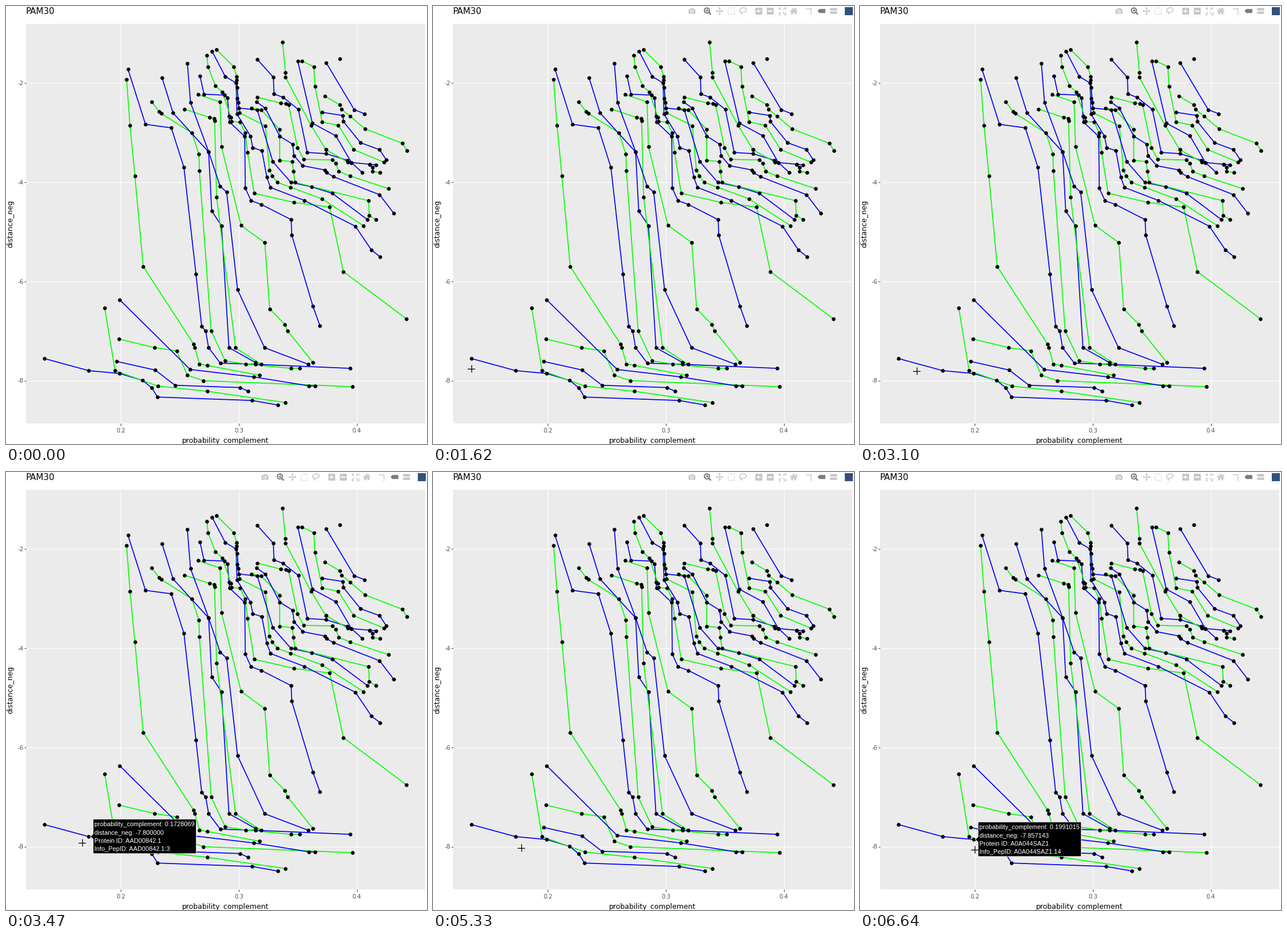
A matplotlib script for the animation above (8000 ms loop, 734 by 763 pixels).

```python
import matplotlib.pyplot as plt
import numpy as np
from matplotlib.animation import FuncAnimation
from matplotlib.collections import LineCollection
from matplotlib.patches import Circle, Ellipse, FancyBboxPatch, Polygon, Rectangle

W, H, DPI = 734, 763, 100
STEP, LOOP = 40, 8000
PX = 72 / DPI  # points per pixel
BLUE, GREEN = "#0000ff", "#00ff00"
PALE, ACTIVE, NAVY = "#c7c7c7", "#7c7c7c", "#33507f"

fig = plt.figure(figsize=(W / DPI, H / DPI), dpi=DPI, facecolor="white")
ax = fig.add_axes([0, 0, 1, 1])
ax.set_xlim(0, W)
ax.set_ylim(H, 0)
ax.axis("off")


def line(xs, ys, color, width, z, **kw):
    kw.setdefault("solid_capstyle", "butt")
    return ax.plot(xs, ys, color=color, lw=width * PX, zorder=z, **kw)[0]


def label(x, y, text, size, color="black", font="DejaVu Sans", z=1, **kw):
    return ax.text(x, y, text, size=size * PX, color=color, family=font,
                   va="baseline", zorder=z, **kw)


# Panel, grid and axis text
ax.add_patch(Rectangle((35, 31), 696, 696, fc="#ebebeb", ec="none", zorder=0))
for x, text in zip((200.2, 405.9, 611.7), ("0.2", "0.3", "0.4")):
    line([x, x], [31, 727], "white", 1.1, 1)
    line([x, x], [727, 730.5], "#333333", 1, 1)
    label(x, 743.2, text, 10, "#4d4d4d", ha="center")
for y, text in zip((134.4, 307.2, 479.9, 652.6), ("-2", "-4", "-6", "-8")):
    line([35, 731], [y, y], "white", 1.1, 1)
    line([31.5, 35], [y, y], "#333333", 1, 1)
    label(30.8, y + 3.8, text, 10, "#4d4d4d", ha="right")
label(35, 14.5, "PAM30", 15)
label(383, 761, "probability_complement", 12.5, ha="center")
label(11.3, 379.5, "distance_neg", 12.5, ha="center", rotation=90,
      rotation_mode="anchor")

# Fronts: every call joins its points from left to right
paths, colors = [], []


def front(color, *xy):
    paths.append(np.reshape(xy, (-1, 2)) + 0.2)
    colors.append(color)


front(BLUE, 67, 614, 144, 635, 198, 640, 238, 652, 254, 665, 264, 681,
      429, 687, 474, 695)
front(GREEN, 172, 526, 190, 635, 265, 662, 351, 671, 486.5, 690.5)
front(BLUE, 193, 619, 260, 634, 294.5, 660.5, 408, 664.5, 422, 671)
front(GREEN, 197, 580, 259, 595, 297.5, 600.5, 316, 643, 344, 652.5,
      604, 663)
front(BLUE, 198, 511.5, 321, 633, 432, 646, 528, 661.5, 539, 662)
front(GREEN, 210, 128, 216, 207.5, 224.5, 295.5, 239, 453.5, 327, 589,
      329, 595, 337, 623.5, 351, 626, 441.5, 643)
front(BLUE, 212.5, 110, 243, 206, 288, 212, 310, 281, 331, 467, 341, 558,
      348, 566, 353, 595, 373.5, 622, 435, 624, 600, 631)
front(GREEN, 254, 167, 267, 184, 270.5, 187, 324, 221, 336, 257.5,
      337, 287, 357.5, 566, 382, 618, 418, 623.5, 497, 631, 512, 631)
front(BLUE, 272, 125, 291, 186, 353, 254, 358.5, 357, 375.5, 382.5,
      388.5, 595, 435, 621)
front(GREEN, 311, 179.5, 355, 194, 363, 195.5, 363.5, 200, 367, 333,
      400, 595, 444.5, 624)
front(BLUE, 316, 100, 321.5, 168, 353, 253.5, 373, 313.5, 384.5, 324,
      403.5, 494, 450.5, 595, 527, 624)
front(GREEN, 334.5, 154, 373, 167, 375.5, 245, 409.5, 382, 451, 412,
      459.5, 527.5, 486, 554.5, 491, 566, 535, 621)
front(BLUE, 338, 121.5, 345, 153.5, 381, 155, 386, 159.5, 388.5, 192,
      389.5, 202, 416, 227, 417, 317, 427, 339, 445, 345.5, 497, 372,
      498, 399, 535, 523, 547, 556.5)
front(GREEN, 350, 85.5, 352, 105.5, 365, 139, 377, 149.5, 392, 194,
      393, 201, 408, 202, 417, 221, 421, 255, 432.5, 326, 502, 342,
      564, 350, 588, 462.5, 697.5, 544.5)
front(BLUE, 359, 78.5, 382, 122.5, 401, 134, 402.5, 188, 426, 226.5,
      430, 246.5, 446, 252, 454.5, 298, 461, 316, 520, 338.5, 609, 383.5,
      637, 425, 652, 436.5)
front(GREEN, 367, 76, 397, 105.5, 402, 123, 403, 142, 403, 161, 407, 186,
      452, 208.5, 459, 285.5, 464, 296, 473, 307, 496, 315.5, 551, 336,
      623, 382.5)
front(BLUE, 402, 129, 405, 168, 406, 177.5, 438, 181, 465, 271, 496.5, 307,
      533, 315, 568.5, 326, 630, 372)
front(GREEN, 428, 177.5, 445, 181, 477, 215, 477, 268.5, 499, 271,
      501, 288, 503.5, 307, 632, 339, 633, 365, 645, 372)
front(BLUE, 437, 167, 452, 178, 477, 226.5, 499.5, 240.5, 502, 260.5,
      517, 278, 556, 285.5, 558.5, 290, 570.5, 297, 651, 328.5, 676, 361)
front(GREEN, 437.5, 158.5, 479, 169, 488, 170, 492.5, 172, 508, 247,
      519, 267, 569, 268, 575, 274, 580, 288, 600, 296, 667, 318)
front(BLUE, 438, 93, 466, 124, 467, 153, 483, 159, 509.5, 180, 525, 255,
      557.5, 257, 594.5, 268.5, 602, 272.5, 634, 275.5, 645, 276.5)
front(GREEN, 482, 62.5, 487, 115.5, 487, 124, 531.5, 207.5, 557.5, 250)
front(GREEN, 557.5, 250, 596, 272)
front(GREEN, 634, 275.5, 638.5, 281, 638.5, 288, 652, 290)
front(BLUE, 508.5, 96, 534, 204, 575, 226, 602, 272.5, 621, 290)
front(GREEN, 515.5, 95.5, 536.5, 105.5, 538.5, 139.5, 551, 202, 579, 207.5,
      606, 250, 659, 272)
front(BLUE, 551, 185, 587, 190.5, 588, 201, 618, 238, 651, 250, 663, 268)
front(GREEN, 556, 157, 582, 172, 585, 180, 600, 192, 626, 214, 691, 239,
      699, 252)
front(BLUE, 558, 98.5, 607, 180.5, 625, 187.5)
front(BLUE, 581.5, 91.5)

ax.add_collection(LineCollection([p for p in paths if len(p) > 1],
                                 colors=[c for p, c in zip(paths, colors)
                                         if len(p) > 1],
                                 linewidths=1.7 * PX, zorder=2))
dots = np.vstack(paths)
ax.plot(dots[:, 0], dots[:, 1], "o", color="black", ms=6.6 * PX, mew=0,
        zorder=3)

# Toolbar
bar = []


def put(patch):
    patch.set_zorder(4)
    bar.append(ax.add_patch(patch))


def box(x, y, w, h, color=PALE):
    put(Rectangle((x, y), w, h, fc=color, ec="none"))


def poly(color, *xy):
    put(Polygon(np.reshape(xy, (-1, 2)), fc=color, ec="none"))


def stroke(xs, ys, color=PALE, width=1.5, **kw):
    bar.append(line(xs, ys, color, width, 4, **kw))


def camera(x, y):
    put(FancyBboxPatch((x - 6, y - 3), 12, 8, fc=PALE, ec="none",
                       boxstyle="round,pad=0,rounding_size=1.5"))
    box(x - 3, y - 5, 6, 3)
    put(Circle((x, y + 1), 2.9, fc="white", ec="none"))
    put(Circle((x, y + 1), 1.7, fc=PALE, ec="none"))


def magnifier(x, y):
    stroke([x + 2.5, x + 6], [y + 2.5, y + 6], ACTIVE, 2.6)
    put(Circle((x - 1, y - 1), 4.4, fc="white", ec=ACTIVE, lw=2 * PX))
    stroke([x - 3.5, x + 1.5], [y - 1, y - 1], ACTIVE)
    stroke([x - 1, x - 1], [y - 3.5, y + 1.5], ACTIVE)


def pan(x, y):
    stroke([x - 5, x + 5], [y, y])
    stroke([x, x], [y - 5, y + 5])
    for s in (-1, 1):
        poly(PALE, x + 7 * s, y, x + 4 * s, y - 2.7, x + 4 * s, y + 2.7)
        poly(PALE, x, y + 7 * s, x - 2.7, y + 4 * s, x + 2.7, y + 4 * s)


def marquee(x, y):
    for d in (-6, -3.2, -0.4, 2.4, 5):
        for s in (-6, 5):
            box(x + d, y + s, 1.6, 1.6)
            box(x + s, y + d, 1.6, 1.6)


def lasso(x, y):
    put(Ellipse((x + 0.3, y - 1.5), 12, 8, angle=-12, fc="none", ec=PALE,
                lw=1.5 * PX))
    stroke([x - 4, x - 2, x - 3, x - 1], [y + 1, y + 3, y + 4.5, y + 6])


def zoom_box(x, y, plus):
    box(x - 6, y - 6, 12, 12)
    box(x - 3.7, y - 0.8, 7.4, 1.7, "white")
    if plus:
        box(x - 0.8, y - 3.7, 1.7, 7.4, "white")


def autoscale(x, y):
    for sx in (-1, 1):
        for sy in (-1, 1):
            stroke([x + 1.8 * sx, x + 5 * sx], [y + 1.8 * sy, y + 5 * sy])
            stroke([x + 2.4 * sx, x + 6 * sx, x + 6 * sx],
                   [y + 6 * sy, y + 6 * sy, y + 2.4 * sy], width=1.3)


def home(x, y):
    stroke([x - 6.3, x, x + 6.3], [y + 0.5, y - 5, y + 0.5], width=1.6)
    poly(PALE, x - 4.6, y + 5.5, x - 4.6, y + 0.8, x, y - 3.2,
         x + 4.6, y + 0.8, x + 4.6, y + 5.5)
    box(x - 1.2, y + 1.8, 2.4, 3.7, "white")
    box(x + 3, y - 5, 1.8, 3.5)


def spikes(x, y):
    for d in (-5.5, -2.2, 1.1):
        box(x + d, y - 4.5, 2, 1.8)
    for d in (-1.5, 1.6, 4.5):
        box(x + 3.2, y + d, 1.9, 1.9)
    box(x + 3, y - 4.8, 2.4, 2.4)


def tag(x, y, h, color):
    poly(color, x - 7, y, x - 4, y - h, x + 6.5, y - h, x + 6.5, y + h,
         x - 4, y + h)


Y = 8.7
camera(451.5, Y)
magnifier(478.5, Y)
pan(499.5, Y)
marquee(519.5, Y)
lasso(540, Y)
zoom_box(567.5, Y, True)
zoom_box(588, Y, False)
autoscale(608.5, Y)
home(629, Y)
spikes(655, Y)
tag(677.5, Y, 3.5, ACTIVE)
tag(698, Y - 3, 2.2, PALE)
tag(698, Y + 3, 2.2, PALE)
box(718, 2, 13.5, 13.5, NAVY)

# Hover label: one shape moved from point to point
tip_box = ax.add_patch(Polygon([[0, 0], [1, 1]], fc="black", ec="white",
                               lw=0.8 * PX, joinstyle="miter", zorder=5))
tip_rows = [label(0, 0, "", 11.05, "white", "Liberation Sans", 6)
            for _ in range(4)]
ROWS = ("probability_complement: ", "distance_neg: ", "Protein ID: ",
        "Info_PepID: ")
TIPS = (
    (1690, 2950, 67, 614, ("0.1351660", "-7.555556", "A0A044UVG8",
                           "AAF64250.1:5")),
    (3400, 5320, 144, 635, ("0.1728069", "-7.800000", "AAD00842.1",
                            "AAD00842.1:3")),
    (6560, LOOP, 198, 640, ("0.1991015", "-7.857143", "A0A044SAZ1",
                            "A0A044SAZ1:14")),
)

cross = [line([0, 0], [0, 0], "black", 1.3, 7) for _ in range(2)]

# Pointer path: time, x, y
PATH = np.array([
    (460, 22, 768), (1220, 66, 654), (1300, 66, 654), (1620, 66, 631),
    (1840, 66, 625), (2750, 66, 625), (2780, 67, 626), (3460, 132, 645),
    (5000, 132, 645), (5020, 135, 647), (5790, 178, 665), (5880, 178, 665),
    (5980, 180, 663), (6330, 198, 661), (6500, 198, 661), (6650, 199, 657),
]).T


def show_tip(t):
    tip = next((p for p in TIPS if p[0] <= t < p[1]), None)
    for part in (tip_box, *tip_rows):
        part.set_visible(tip is not None)
    if tip is None:
        return
    x, y, values = tip[2:]
    left, right, top, low = x + 8, x + 187.7, y - 30.2, y + 29.8
    tip_box.set_xy([(x + 3, y), (left, y - 4.5), (left, top), (right, top),
                    (right, low), (left, low), (left, y + 4.5)])
    for i, (row, name, value) in enumerate(zip(tip_rows, ROWS, values)):
        row.set_text(name + value)
        row.set_position((x + 10.3, y - 17.8 + 14.4 * i))


def draw(i):
    t = (i + 0.5) * STEP
    fade = float(np.clip((t - 460) / 300, 0, 1))
    for part in bar:
        part.set_alpha(fade)
    x, y = (np.interp(t, PATH[0], row) for row in PATH[1:])
    x, y = round(x) + 0.5, round(y) + 0.5
    inside = t >= 460 and x > 35 and y < 727
    cross[0].set_data([x - 6.5, x + 6.5], [y, y])
    cross[1].set_data([x, x], [y - 6.5, y + 6.5])
    for arm in cross:
        arm.set_visible(inside)
    show_tip(t)
    return [*bar, tip_box, *tip_rows, *cross]


anim = FuncAnimation(fig, draw, frames=LOOP // STEP, interval=STEP,
                     repeat=True, repeat_delay=0, blit=False)
plt.show()
```
